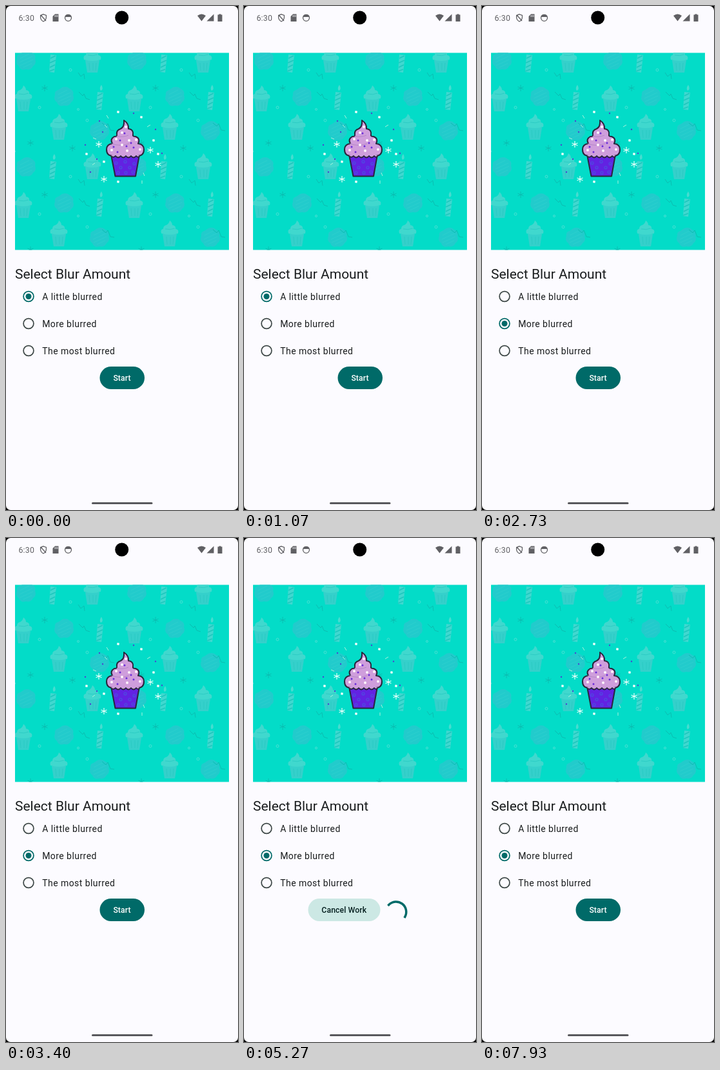
Write an HTML page that moves like this. It is 360 by 780 pixels and loops after 8000 ms.

```html
<!DOCTYPE html>
<html lang="en">
<head>
<meta charset="utf-8">
<title>Blur picker</title>
<style>
  html, body { margin: 0; width: 100%; height: 100%; overflow: hidden; background: #000; }
  svg { display: block; width: 360px; height: 780px; font-family: Roboto, sans-serif; }
  .label { font-size: 14px; letter-spacing: .44px; }
  .btn { font-size: 12.25px; font-weight: 500; letter-spacing: .09px; text-anchor: middle; }
</style>
</head>
<body>
<svg viewBox="0 0 360 780" fill="#191c1d">
  <defs>
    <g id="cake">
      <path d="M-11 1H11L8 20H-8Z" fill="#35d0cb"/>
      <path d="M-13 0Q-15-6-10-7Q-10-12-5-13Q-1-15 0-20Q4-17 4-13Q10-12 9-7Q15-6 13 0Q0 4-13 0Z" fill="#40d8ce"/>
      <path d="M-7-7Q1-5 8-8M-5 5L-4 17M1 5V17M6 5L5 17" fill="none" stroke="#26c8c0" stroke-width=".8"/>
    </g>
    <g id="candle">
      <path d="M-4-9L5-8L2 19L-6 18Z" fill="#40d8d0"/>
      <path d="M-4-3L4-7M-5 4L4 0M-5 11L3 7M-6 17L2 14" stroke="#1cc8be" stroke-width="1.800"/>
      <path d="M2-20Q-2-14 1-11Q6-13 2-20Z" fill="#48dcd0"/>
    </g>
    <g id="balloon">
      <path d="M-3-15Q4-18 9-13Q16-10 14-3Q17 4 11 8Q8 15 0 13Q-8 16-11 8Q-17 4-14-3Q-15-10-9-11Z" fill="#22cbcc"/>
      <path d="M-9-4L5-11M-10 2L10-7M-9 7L11-2M-4 10L9 4" stroke="#2bcfce"/>
    </g>
    <path id="star" d="M0-5V5M-4.5-2L4.5 2M-4.5 2L4.5-2" fill="none"/>
    <pattern id="party" patternUnits="userSpaceOnUse" x="0" y="115" width="172" height="165" viewBox="0 115 172 165">
      <use href="#cake" x="27" y="143"/><use href="#cake" x="82" y="187"/><use href="#cake" x="134" y="248"/>
      <use href="#candle" x="146" y="142"/><use href="#candle" x="73" y="249"/>
      <use href="#balloon" x="90" y="141"/><use href="#balloon" x="145" y="194"/><use href="#balloon" x="31" y="250"/>
      <g fill="none" stroke="#0bb9ae" stroke-width=".9">
        <path d="M112 268L116 274L121 270L122 278M113 133L119 139L121 136L124 143L130 145M149 181L155 186L158 182L162 192L168 193"/>
        <use href="#star" x="60" y="127"/><use href="#star" x="38" y="212"/><use href="#star" x="103" y="220"/>
      </g>
      <g fill="none" stroke="#48dfd2">
        <circle cx="52" cy="157" r="2"/><circle cx="126" cy="177" r="2"/><circle cx="112" cy="160" r="1.5"/>
        <circle cx="13" cy="225" r="1.5"/><circle cx="100" cy="264" r="2"/>
      </g>
    </pattern>
    <path id="frosting" d="M183 177Q191 182 190 190Q198 191 197 199Q196 202 201 202Q209 205 205 213Q214 214 214 222Q214 232 204 232H166Q156 232 156 222Q156 214 165 213Q161 206 168 202Q173 202 172 199Q171 192 178 190Q184 187 183 177Z"/>
  </defs>

  <rect width="360" height="780" rx="7" fill="#fcfbff"/>

  <g fill="#606064">
    <text x="19.5" y="23" font-size="12.3" letter-spacing=".2">6:30</text>
    <path d="M58 12.8L62.4 14.5V18Q62 22 58 24Q54 22 53.6 18V14.5ZM54 14L62 23" fill="none" stroke="#606064" stroke-width="1.3"/>
    <path d="M76 12.5H81.5V24H72.5V16Z"/>
    <path d="M76 14V17M78 14V17M80 14V17" stroke="#fcfbff" stroke-width=".8"/>
    <circle cx="96.5" cy="18.3" r="5" fill="none" stroke="#606064" stroke-width="1.3"/>
    <path d="M92 17Q92 13 96.5 13Q101 13 101 17Z"/>
    <path d="M297 15Q303.5 10 310 15L303.5 23.5Z"/>
    <path d="M322.5 12.5V23.5H311.5Z"/>
    <path d="M330.5 12.5H333.5V13.5H335.5V24H328.5V13.5H330.5Z"/>
  </g>
  <circle cx="179.7" cy="18" r="10.5" fill="#000"/>

  <rect x="14" y="72.5" width="332" height="305" fill="#03dcc8"/>
  <rect x="14" y="72.5" width="332" height="305" fill="url(#party)"/>

  <g id="confetti"></g>
  <g stroke="#eafffa" stroke-width="1.2">
    <use href="#star" x="144" y="214"/><use href="#star" x="224" y="223"/>
    <use href="#star" x="152" y="268"/><use href="#star" x="236" y="245"/>
  </g>
  <g stroke="#28263c" stroke-width="2" stroke-linejoin="round">
    <path d="M163 230H207L201 263.5H169.5Z" fill="#6222e2"/>
    <use href="#frosting" fill="#cf9edc"/>
    <path d="M162 231Q166 236 170 232Q174 237 178 232Q182 237 186 232Q190 237 194 232Q198 237 202 232Q205 236 208 231" fill="#cf9edc" stroke-width="1.8"/>
  </g>
  <path d="M164 213Q178 218 191 213M172 201Q181 204 190 200" fill="none" stroke="#b488c6"/>
  <g id="sprinkles"></g>

  <text x="14" y="422" font-size="21">Select Blur Amount</text>
  <g id="options"></g>
  <circle id="touch" cx="84.5" cy="488.5" r="8" fill="#fff" fill-opacity=".35" stroke="#c9c9ce" stroke-width=".8"/>

  <g id="start">
    <rect id="startFill" x="145.5" y="558" width="69.5" height="35" rx="17.5"/>
    <text class="btn" x="180" y="580" fill="#fff">Start</text>
  </g>
  <g id="working">
    <rect x="99.5" y="558" width="112" height="35" rx="17.5" fill="#cce8e4"/>
    <text class="btn" x="155.3" y="580" fill="#051f1f">Cancel Work</text>
    <path id="spinner" fill="none" stroke="#006a68" stroke-width="3.5" stroke-linecap="square"/>
  </g>
  <rect x="133" y="768" width="94.5" height="3" rx="1.5" fill="#58585c"/>
</svg>
<script>
const LOOP = 8000, SELECT = 2270, PRESS = 4230, WORK = 4390, DONE = 7430;
const TEAL = '#006a68', DARK = '#3f4948';
const $ = id => document.getElementById(id);
const clamp = x => Math.max(0, Math.min(1, x));
const show = (el, on) => el.setAttribute('visibility', on ? 'visible' : 'hidden');

const dots = (list, r, fill) => list.map(([x, y]) =>
  `<circle cx="${x}" cy="${y}" r="${r}" fill="${fill}"/>`).join('');

$('confetti').innerHTML =
  [[174, 164], [210, 172], [152, 241], [125, 229], [236, 229], [174, 272], [229, 208]].map(([x, y]) =>
    `<rect x="${x - 1.7}" y="${y - 1.7}" width="3.4" height="3.4" fill="#f4fffc" transform="rotate(12 ${x} ${y})"/>`).join('') +
  dots([[150, 195], [145, 178], [232, 191], [131, 257], [123, 215], [242, 228], [141, 237], [198, 166]], 1.2, '#4a45d0') +
  '<path d="M156 169L159 174M135 204L140 206M134 246L138 243M213 258L215 263M219 187L224 184M211 270V275M153 184L157 188" stroke="#a8f2dc" fill="none"/>';

$('sprinkles').innerHTML =
  dots([[186, 187], [180, 196], [171, 206], [191, 208], [202, 207], [180, 215], [164, 223], [188, 224], [208, 222]], 2, '#fff6fc') +
  dots([[184, 197], [177, 208], [194, 212], [167, 218], [173, 226], [198, 219], [187, 217]], 1.5, '#6a2cd8') +
  [[171, 243], [185, 241], [199, 244], [178, 250], [192, 250], [174, 258], [186, 258], [197, 257]].map(([x, y]) =>
    `<circle cx="${x}" cy="${y}" r="2" fill="none" stroke="#4a52e0" stroke-width="1.1"/>`).join('');

$('options').innerHTML = ['A little blurred', 'More blurred', 'The most blurred'].map((label, i) => {
  const y = 449.5 + 42 * i;
  return `<circle id="ring${i}" cx="35" cy="${y}" r="7.9" fill="none" stroke="${DARK}" stroke-width="1.75"/>
    <circle id="dot${i}" cx="35" cy="${y}" r="0" fill="${TEAL}"/>
    <text class="label" x="56.2" y="${y + 5}">${label}</text>`;
}).join('');

function radio(i, amount) {
  $('dot' + i).setAttribute('r', 4.5 * amount);
  $('ring' + i).setAttribute('stroke', amount > .5 ? TEAL : DARK);
}

// cubic-bezier(.4, 0, .2, 1)
function ease(x) {
  let lo = 0, hi = 1;
  for (let i = 0; i < 20; i++) {
    const s = (lo + hi) / 2;
    if (1.2 * s * (1 - s) ** 2 + .6 * s * s * (1 - s) + s ** 3 < x) lo = s; else hi = s;
  }
  return 3 * lo * lo * (1 - lo) + lo ** 3;
}

function spin(t) {
  const turn = Math.floor(t / 1332), phase = t % 1332;
  const head = 290 * ease(clamp(phase / 666));
  const tail = 290 * ease(clamp((phase - 666) / 666));
  const from = -90 + 216 * turn + 286 * phase / 1332 + tail;
  const sweep = Math.max(.1, head - tail);
  const point = deg => {
    const a = deg * Math.PI / 180;
    return `${236 + 15.75 * Math.cos(a)} ${578.7 + 15.75 * Math.sin(a)}`;
  };
  $('spinner').setAttribute('d',
    `M${point(from)}A15.75 15.75 0 ${+(sweep > 180)} 1 ${point(from + sweep)}`);
}

function draw(t) {
  const picked = clamp((t - SELECT) / 100);
  radio(0, 1 - picked);
  radio(1, picked);
  show($('touch'), t >= 2130 && t < SELECT);

  const working = t >= WORK && t < DONE;
  show($('start'), !working);
  show($('working'), working);
  const press = t < WORK ? clamp((t - PRESS) / 80) : 0;
  const mix = (a, b) => Math.round(a + (b - a) * press);
  $('startFill').setAttribute('fill', `rgb(${mix(0, 30)},${mix(106, 122)},${mix(104, 120)})`);
  if (working) spin(t - WORK);
}

const begin = performance.now();
function frame(now) {
  draw(Math.max(0, now - begin) % LOOP);
  requestAnimationFrame(frame);
}
draw(0);
requestAnimationFrame(frame);
</script>
</body>
</html>
```
